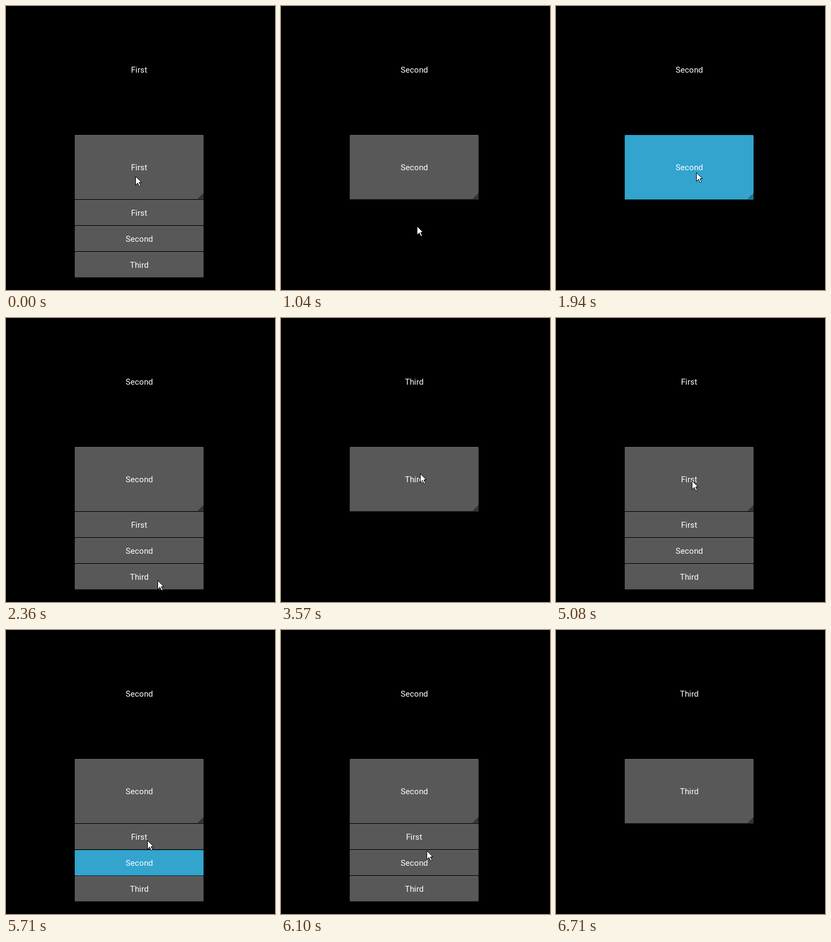
An HTML page with a canvas for the animation above (7.43 s loop, 497 px wide and 524 px high).

```html
<!DOCTYPE html>
<html>
<head>
<meta charset="utf-8">
<style>
html, body { margin: 0; width: 100%; height: 100%; overflow: hidden; background: #000; }
canvas { display: block; }
</style>
</head>
<body>
<canvas id="stage" width="497" height="524"></canvas>
<script>
const ctx = document.getElementById('stage').getContext('2d');
const LOOP = 7430;
const OPTIONS = ['First', 'Second', 'Third'];
const PRESS = 150;         // how long the main button stays lit before the list opens
const UPDATE = 125;        // typical time between pointer updates
const POINTER_END = 6710;

// Each visit to the list, in ms
const VISITS = [
  { open: 0, pick: 890, close: 1040, option: 1 },
  { open: 2090, pick: 2790, close: 2790, option: 2 },
  { open: 3840, pick: 4510, close: 4510, option: 0 },
  { open: 5080, pick: 5590, close: 5830, option: 1 },
  { open: 6100, pick: 6560, close: 6710, option: 2 }
];

// Pointer strokes: [first update, last update, x, y reached]
const STROKES = [
  [0, 0, 239, 314],
  [250, 640, 245, 433],
  [1040, 1040, 251, 406],
  [1160, 1160, 252, 150],
  [1310, 1550, 257, 270],
  [1700, 1700, 259, 307],
  [2240, 2360, 280, 484],
  [2790, 3090, 230, 225],
  [3210, 3570, 257, 287],
  [3960, 4230, 264, 384],
  [4510, 4510, 264, 378],
  [4630, 4780, 251, 300],
  [5200, 5440, 261, 425],
  [5710, 5710, 261, 388],
  [5830, 5950, 267, 328],
  [6100, 6100, 269, 407],
  [6250, 6250, 276, 474]
];

const easeOut = k => 1 - (1 - k) ** 3;

function pointerAt(t) {
  const i = STROKES.findLastIndex(s => s[0] <= t);
  const [first, last, x, y] = STROKES[i];
  const [, , x0, y0] = STROKES[Math.max(0, i - 1)];
  const gaps = Math.round((last - first) / UPDATE);
  const done = gaps ? Math.min(gaps, Math.floor((t - first) / (last - first) * gaps)) : 0;
  const k = easeOut((done + 1) / (gaps + 1));
  return [Math.round(x0 + (x - x0) * k), Math.round(y0 + (y - y0) * k)];
}

function rect(x, y, w, h, color) {
  ctx.fillStyle = color;
  ctx.fillRect(x, y, w, h);
}

// Letters sit on whole pixels
function label(text, centerY) {
  ctx.font = '15px Roboto, sans-serif';
  ctx.fillStyle = '#fff';
  const advance = c => Math.round(ctx.measureText(c).width);
  const width = [...text].reduce((sum, c) => sum + advance(c), 0);
  let x = Math.round(246 - width / 2);
  for (const c of text) {
    ctx.fillText(c, x, centerY + 6);
    x += advance(c);
  }
}

function button(y, h, text, lit, corner) {
  const bottom = y + h;
  ctx.save();
  ctx.beginPath();
  ctx.roundRect(127, y + 1, 238, h - 1, 1.5);
  ctx.clip();
  rect(127, y + 1, 238, h - 1, lit ? '#32a4ce' : '#585858');
  if (!lit) {
    rect(127, y + 1, 238, 1, '#737373');
    rect(127, bottom - 1, 238, 1, '#3c3c3c');
  }
  if (corner) {
    ctx.fillStyle = lit ? '#226f8c' : '#353535';
    ctx.beginPath();
    ctx.moveTo(365, bottom - 12);
    ctx.lineTo(365, bottom - 1);
    ctx.lineTo(353.5, bottom - 1);
    ctx.fill();
  }
  ctx.restore();
  label(text, y + h / 2);
}

// Arrow head and left notch, then the slanted tail
function pointer(x, y) {
  const span = (dx, dy, w, color) => w > 0 && rect(x + dx, y + dy, w, 1, color);
  for (let r = 0; r < 17; r++) {
    const w = r < 12 ? r + 1 : 17 - r;
    span(0, r, w, '#000');
    span(1, r, r === 11 ? 6 : w - 2, '#fff');
  }
  for (let r = 12; r < 18; r++) {
    const dx = 4 + (r - 12 >> 1);
    span(dx, r, 4, '#000');
    span(dx + 1, r, 2, '#fff');
  }
  span(7, 18, 2, '#000');
}

function draw(now) {
  const t = now % LOOP;
  const chosen = VISITS.findLast(v => v.pick <= t)?.option ?? 0;
  const visit = VISITS.find(v => v.open <= t && t < v.close);
  const pressing = VISITS.some(v => v.open - PRESS <= t && t < v.open);
  rect(0, 0, 497, 524, '#000');
  label(OPTIONS[chosen], 117);
  button(237, 120, OPTIONS[chosen], pressing, true);
  if (visit) OPTIONS.forEach((name, i) =>
    button(357 + i * 48, 48, name, t >= visit.pick && i === visit.option));
  if (t < POINTER_END) pointer(...pointerAt(t));
}

let start;
function frame(now) {
  start ??= now;
  draw(Math.max(0, now - start));
  requestAnimationFrame(frame);
}
draw(0);
requestAnimationFrame(frame);
</script>
</body>
</html>
```
